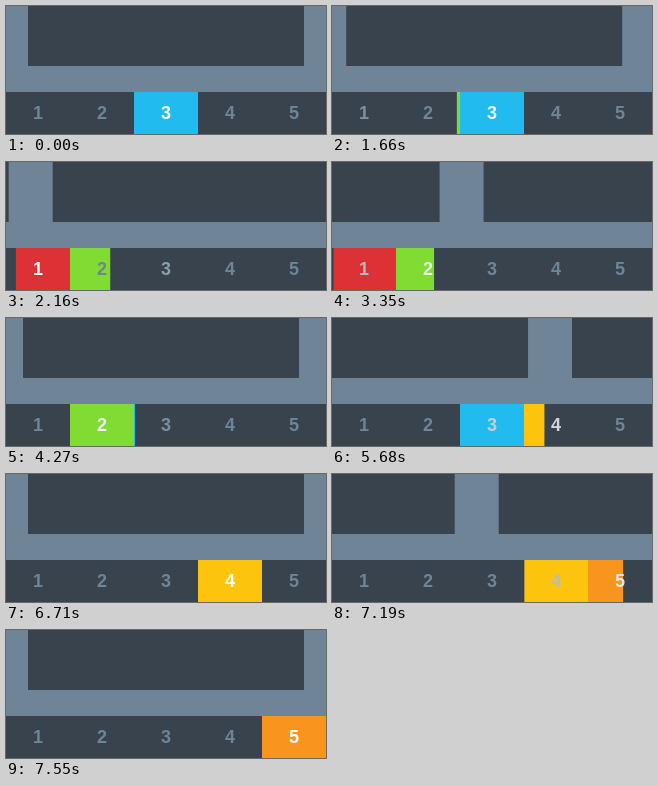
Write an HTML page that moves like this. It is 320 by 128 pixels and loops after 8000 ms.

```html
<!DOCTYPE html>
<html lang="en">
<head>
<meta charset="utf-8">
<title>Sliding tabs</title>
<style>
  html, body { margin: 0; width: 100%; height: 100%; overflow: hidden; background: #6f8497; }
  svg { display: block; width: 100vw; height: 100vh; }
  text { font: bold 18px "Liberation Sans", Arial, sans-serif; text-anchor: middle; }
</style>
</head>
<body>
<svg viewBox="0 0 320 128">
  <defs><clipPath id="window"><rect id="marker" y="86" height="42"/></clipPath></defs>
  <rect width="320" height="128" fill="#6f8497"/>
  <g id="pages" fill="#39434e">
    <rect x="22" y="-10" width="276" height="70"/>
    <rect x="342" y="-10" width="276" height="70"/>
  </g>
  <rect y="86" width="320" height="42" fill="#39434e"/>
  <g id="strip" clip-path="url(#window)"></g>
  <g id="labels"></g>
</svg>
<script>
const LOOP = 8000, STEP = 20, SLIDE_STEPS = 36, TAB = 64;
const COLORS = ['#dc3236', '#80dc32', '#22bbef', '#fcc40c', '#f9951c'];
const IDLE = [111, 132, 151], ACTIVE = [255, 255, 255];

// lead: steps already run when the slide appears; hold: how long that first pose stays
const SLIDES = [
  { from: 2, to: 0, start: 1560, lead: 2, hold: 80 },
  { from: 0, to: 1, start: 2950, lead: 3, hold: 80 },
  { from: 1, to: 2, start: 4270, lead: 3.2, hold: 80 },
  { from: 2, to: 3, start: 5400, lead: 3.1, hold: 80 },
  { from: 3, to: 4, start: 6730, lead: 3, hold: 160 }
];

const $ = id => document.getElementById(id);
const clamp = v => Math.max(0, Math.min(1, v));
const mix = (a, b, k) => a + (b - a) * k;

function add(parent, tag, attrs) {
  const el = document.createElementNS('http://www.w3.org/2000/svg', tag);
  for (const key in attrs) el.setAttribute(key, attrs[key]);
  return parent.appendChild(el);
}

// CSS-style cubic Bezier easing, solved by bisection
function bezier(x1, y1, x2, y2) {
  const at = (a, b, s) => 3 * a * s * (1 - s) ** 2 + 3 * b * s * s * (1 - s) + s ** 3;
  return x => {
    if (x <= 0) return 0;
    if (x >= 1) return 1;
    let lo = 0, hi = 1;
    for (let i = 0; i < 24; i++) {
      const mid = (lo + hi) / 2;
      if (at(x1, x2, mid) < x) lo = mid; else hi = mid;
    }
    return at(y1, y2, lo);
  };
}
const easeInOut = bezier(0.42, 0, 0.58, 1);
const ease = bezier(0.25, 0.1, 0.25, 1);

const labels = COLORS.map((fill, i) => {
  add($('strip'), 'rect', { x: i * TAB, y: 86, width: TAB, height: 42, fill });
  const label = add($('labels'), 'text', { x: i * TAB + 32, y: 113 });
  label.textContent = i + 1;
  return label;
});

function progress(slide, t) {
  const since = t - slide.start;
  if (since < 0) return 0;
  const steps = Math.max(0, Math.floor((since - slide.hold) / STEP) + 1);
  return clamp((slide.lead + steps) / SLIDE_STEPS);
}

function draw(t) {
  const slide = SLIDES.filter(s => t >= s.start).pop() || SLIDES[0];
  const { from, to } = slide;
  const x = progress(slide, t);
  const front = easeInOut(x);
  const back = easeInOut(clamp(x * 2 - 1));

  $('pages').setAttribute('transform', `translate(${-320 * front} 0)`);

  const forward = to > from;
  const left = TAB * mix(from, to, forward ? back : front);
  const right = TAB * (1 + mix(from, to, forward ? front : back));
  $('marker').setAttribute('x', left);
  $('marker').setAttribute('width', right - left);

  labels.forEach((label, i) => {
    const lit = i === to ? ease(x) : i === from ? 1 - x : 0;
    const rgb = IDLE.map((c, k) => Math.round(mix(c, ACTIVE[k], lit)));
    label.setAttribute('fill', `rgb(${rgb})`);
  });
}

const begin = performance.now();
function tick() {
  draw((performance.now() - begin) % LOOP);
  requestAnimationFrame(tick);
}
tick();
</script>
</body>
</html>
```
